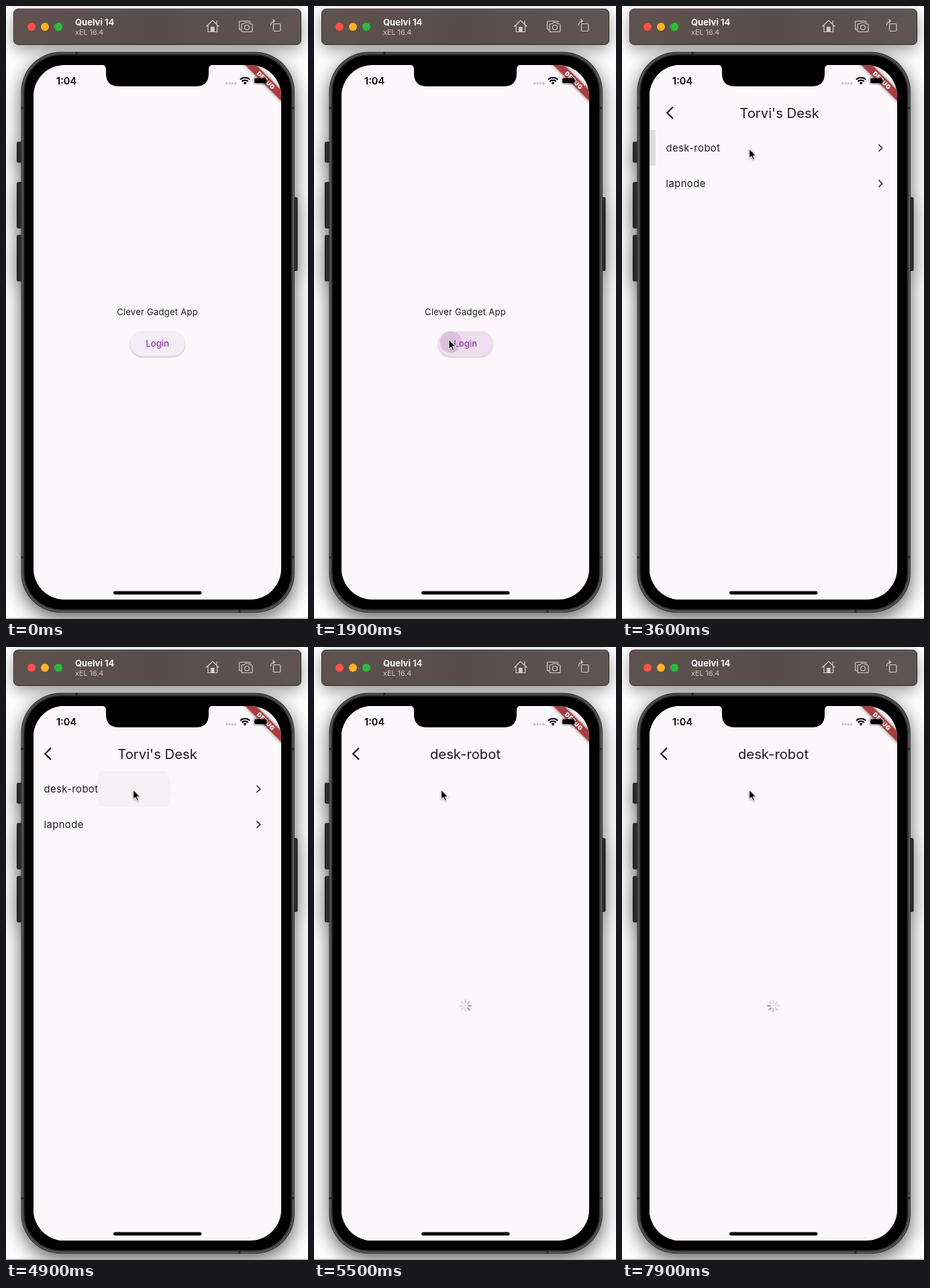
Animation, 450 px wide and 914 px high, one loop 8000 ms. Source, as an HTML page:

```html
<!DOCTYPE html>
<html lang="en">
<head>
<meta charset="utf-8">
<title>Phone walkthrough</title>
<style>
html, body { margin: 0; width: 100%; height: 100%; overflow: hidden; background: #fff; }
svg { display: block; width: 450px; height: 914px; font-family: Inter, Roboto, sans-serif; }
.bar { filter: drop-shadow(0 7px 11px rgba(0,0,0,.4)); }
.body { filter: drop-shadow(0 9px 14px rgba(0,0,0,.62)); }
.line { fill: none; stroke: #d3cdca; stroke-width: 1.2; stroke-linejoin: round; stroke-linecap: round; }
.page > rect:first-child { fill: #fcf7fb; }
.page text { fill: #1d1b20; }
.mid { text-anchor: middle; }
.title { font-size: 20.3px; text-anchor: middle; }
.item { font-size: 14.8px; letter-spacing: .42px; }
.back { fill: none; stroke: #1d1b20; stroke-width: 2.3; }
.next { fill: none; stroke: #49454f; stroke-width: 1.9; }

/* One 8 s timeline: 1% = 80 ms */
.home, .loc, .desk, .robot, .loading, .list, .cursor, .press, .ink, .glow { animation: 8s linear infinite; }
.home { animation-name: home; }
.loc { animation-name: loc; }
.desk { animation-name: desk; }
.robot { animation-name: robot; }
.loading { animation-name: loading; }
.list { animation-name: list; }
.cursor { animation-name: cursor; }
.press { animation-name: press; }
.ink { fill: rgba(200,200,200,.4); }
.glow { fill: rgba(188,188,188,.44); }
.ink.login { fill: #9a4fae; animation-name: ink-login; }
.ink.a { animation-name: ink-a; }
.ink.b { animation-name: ink-b; }
.glow.a { animation-name: glow-a; }
.glow.b { animation-name: glow-b; }
.spin { animation: spin 1s steps(8) infinite; }
.spin.a { animation-delay: -.09s; }
.spin.b { animation-delay: -.05s; }

@keyframes home {
  0%, 23.875% { transform: translateX(0); animation-timing-function: cubic-bezier(.35,.91,.33,.97); }
  30.125%, 100% { transform: translateX(-123px); }
}
@keyframes loc {
  0%, 23.875% { transform: translateX(369px); animation-timing-function: cubic-bezier(.283,.044,.545,.57); }
  25.1125% { transform: translateX(169.4px); animation-timing-function: cubic-bezier(.209,1,.4345,.976); }
  30.125%, 41.175% { transform: translateX(0); animation-timing-function: cubic-bezier(.35,.91,.33,.97); }
  47.425%, 100% { transform: translateX(-123px); }
}
@keyframes desk {
  0%, 41.175% { transform: translateX(369px); animation-timing-function: cubic-bezier(.283,.044,.545,.57); }
  42.4125% { transform: translateX(169.4px); animation-timing-function: cubic-bezier(.209,1,.4345,.976); }
  47.425%, 61.875% { transform: translateX(0); animation-timing-function: cubic-bezier(.35,.91,.33,.97); }
  68.125%, 100% { transform: translateX(-123px); }
}
@keyframes robot {
  0%, 61.875% { transform: translateX(369px); animation-timing-function: cubic-bezier(.283,.044,.545,.57); }
  63.1125% { transform: translateX(169.4px); animation-timing-function: cubic-bezier(.209,1,.4345,.976); }
  68.125%, 100% { transform: translateX(0); }
}
@keyframes loading {
  0% { opacity: 1; animation-timing-function: step-end; }
  32.5%, 100% { opacity: 0; }
}
@keyframes list {
  0% { opacity: 0; animation-timing-function: step-end; }
  32.5%, 100% { opacity: 1; }
}
@keyframes cursor {
  0% { opacity: 0; transform: translate(238px,350px); animation-timing-function: step-end; }
  12.5% { opacity: 1; transform: translate(238px,350px); animation-timing-function: ease-out; }
  16.25%, 35% { opacity: 1; transform: translate(201px,497px); }
  36.25% { opacity: 1; transform: translate(200.5px,357px); }
  37.5% { opacity: 1; transform: translate(192px,238px); }
  38.75%, 100% { opacity: 1; transform: translate(189.5px,212.5px); }
}
@keyframes press {
  0%, 22.9% { opacity: 0; }
  23.7%, 30% { opacity: 1; }
  31%, 100% { opacity: 0; }
}
@keyframes ink-login {
  0%, 22.9% { r: 13px; opacity: 0; }
  23.75% { r: 16px; opacity: .2; }
  26% { r: 48px; opacity: .2; }
  29%, 100% { r: 48px; opacity: 0; }
}
@keyframes ink-a {
  0%, 39.75% { r: 55px; opacity: 0; }
  40.7% { r: 75px; opacity: 1; }
  43% { r: 235px; opacity: 1; }
  45.5%, 100% { r: 235px; opacity: 0; }
}
@keyframes ink-b {
  0%, 60.94% { r: 55px; opacity: 0; }
  61.25% { r: 55.5px; opacity: .33; }
  61.9% { r: 75px; opacity: 1; }
  64.4% { r: 235px; opacity: 1; }
  67%, 100% { r: 235px; opacity: 0; }
}
@keyframes glow-a {
  0%, 40% { opacity: 0; }
  41.9%, 47.4% { opacity: 1; }
  48%, 100% { opacity: 0; }
}
@keyframes glow-b {
  0%, 61.4% { opacity: 0; }
  63%, 68% { opacity: 1; }
  69%, 100% { opacity: 0; }
}
@keyframes spin { to { transform: rotate(360deg); } }
</style>
</head>
<body>
<svg viewBox="0 0 450 914" xmlns="http://www.w3.org/2000/svg">
  <defs>
    <clipPath id="screen"><rect x="41" y="88" width="369" height="797" rx="46"/></clipPath>
    <clipPath id="row"><rect x="41" y="185" width="369" height="53"/></clipPath>
    <clipPath id="pill"><rect x="185" y="485" width="81.5" height="37.5" rx="18.75"/></clipPath>
    <linearGradient id="barFill" x2="1"><stop stop-color="#5f534f"/><stop offset=".5" stop-color="#574d4a"/><stop offset="1" stop-color="#5f5552"/></linearGradient>
    <path id="back" class="back" d="M67 150.500l-8.700 8.700 8.700 8.700"/>
    <path id="next" class="next" d="M373.500 206.500l5.200 5.200-5.200 5.200"/>
    <path id="tick" d="M0-8.500V-4.500" stroke="#3c3c44" stroke-width="1.9" stroke-linecap="round"/>
    <g id="ticks">
      <g opacity=".18">
        <use href="#tick"/><use href="#tick" transform="rotate(45)"/>
        <use href="#tick" transform="rotate(90)"/><use href="#tick" transform="rotate(135)"/>
      </g>
      <use href="#tick" transform="rotate(180)" opacity=".28"/>
      <use href="#tick" transform="rotate(225)" opacity=".38"/>
      <use href="#tick" transform="rotate(270)" opacity=".48"/>
      <use href="#tick" transform="rotate(315)" opacity=".58"/>
    </g>
  </defs>

  <rect width="450" height="914" fill="#fff"/>

  <g class="body">
    <g fill="#2b2c2c" stroke="#121212">
      <rect x="16.500" y="203" width="9" height="30" rx="1.500"/>
      <rect x="16.500" y="263" width="9" height="68" rx="1.500"/>
      <rect x="16.500" y="342" width="9" height="68" rx="1.500"/>
      <rect x="425" y="285.500" width="9" height="109" rx="1.500"/>
    </g>
    <rect x="22.500" y="68.500" width="407.500" height="836" rx="59" fill="#2a2a2a"/>
  </g>
  <rect x="24" y="70" width="404.500" height="833" rx="57.500" fill="#454646" stroke="#686969"/>
  <rect x="27" y="73" width="398.500" height="827" rx="55" fill="#000" stroke="#292a2a"/>
  <path d="M22.500 152h5M425 152h5M22.500 822h5M425 822h5M105 68.500v5M348 899.500v5" stroke="#292929" stroke-width="3"/>

  <g class="bar">
    <rect x="11.500" y="4.500" width="428" height="53" rx="6.500" fill="url(#barFill)" stroke="#2c2725"/>
  </g>
  <path d="M17 5.700H434" stroke="#80766f" stroke-width=".8"/>
  <circle cx="38" cy="31" r="6" fill="#fe5148"/>
  <circle cx="58" cy="31" r="6" fill="#fdb124"/>
  <circle cx="78" cy="31" r="6" fill="#29bd3a"/>
  <text x="103" y="29" font-size="13" font-weight="700" fill="#fff">Quelvi 14</text>
  <text x="103" y="43" font-size="10.800" fill="#d0cac7">xEL 16.4</text>
  <g class="line">
    <path d="M298.500 30.500l9.300-9 9.300 9M301 28.500v10h13.600v-10M314 26.500v-4.500"/>
    <path d="M305.500 38v-6.500h4.600v6.500z" fill="#d3cdca"/>
    <path d="M350 35.500h-.5a2 2 0 0 1-2-2v-9a2 2 0 0 1 2-2h12.500a2 2 0 0 1 2 2"/>
    <path d="M353 26.500h2l1.500-2h5l1.500 2h2a2 2 0 0 1 2 2v8a2 2 0 0 1-2 2h-12a2 2 0 0 1-2-2v-8a2 2 0 0 1 2-2z"/>
    <circle cx="359" cy="32" r="3.500"/>
    <rect x="398.500" y="26.500" width="10.500" height="11" rx="1.500"/>
    <path d="M394.500 28.500c0-4 1.500-6 5.500-6M397.800 20l2.500 2.500-2.500 2.500"/>
  </g>

  <g clip-path="url(#screen)">
    <g class="page home">
      <rect x="41" y="88" width="369" height="797"/>
      <text class="mid" x="225.500" y="461" font-size="13" letter-spacing=".25">Clever Gadget App</text>
      <rect x="185" y="485" width="81.500" height="37.500" rx="18.750" fill="#f4ecf6" style="filter:drop-shadow(0 1px 1px rgba(0,0,0,.3))"/>
      <g clip-path="url(#pill)">
        <rect class="press" x="185" y="485" width="82" height="38" fill="#efdfef"/>
        <circle class="ink login" cx="204" cy="501"/>
      </g>
      <text class="mid" x="225.700" y="508.300" font-size="13" font-weight="500" letter-spacing=".1" style="fill:#8a3a9c">Login</text>
    </g>

    <g class="page loc">
      <rect x="41" y="88" width="369" height="797"/>
      <use href="#back"/>
      <text class="title" x="225.500" y="166.500">Locations</text>
      <g class="loading"><g transform="translate(225.500 535)"><g class="spin a"><use href="#ticks"/></g></g></g>
      <g class="list">
        <g clip-path="url(#row)">
          <rect class="glow a" x="41" y="185" width="369" height="53"/>
          <circle class="ink a" cx="190" cy="212"/>
        </g>
        <text class="item" x="56.500" y="217.200">Torvi's Desk</text>
        <text class="item" x="56.500" y="270.200">Tundo Rental</text>
        <use href="#next"/><use href="#next" y="53"/>
      </g>
    </g>

    <g class="page desk">
      <rect x="41" y="88" width="369" height="797"/>
      <use href="#back"/>
      <text class="title" x="225.500" y="166.500">Torvi's Desk</text>
      <g clip-path="url(#row)">
        <rect class="glow b" x="41" y="185" width="369" height="53"/>
        <circle class="ink b" cx="190" cy="212"/>
      </g>
      <text class="item" x="56.500" y="217.200">desk-robot</text>
      <text class="item" x="56.500" y="270.200">lapnode</text>
      <use href="#next"/><use href="#next" y="53"/>
    </g>

    <g class="page robot">
      <rect x="41" y="88" width="369" height="797"/>
      <use href="#back"/>
      <text class="title" x="225.500" y="166.500">desk-robot</text>
      <g transform="translate(225.500 535)"><g class="spin b"><use href="#ticks"/></g></g>
    </g>

    <g transform="translate(410 88) rotate(45)">
      <rect x="-45" y="26.500" width="90" height="11.300" fill="#a93e40" style="filter:drop-shadow(0 0 2.500px rgba(0,0,0,.5))"/>
      <text class="mid" y="35.500" font-size="9" font-weight="900" letter-spacing=".5" fill="#fff">DEBUG</text>
    </g>
  </g>

  <path d="M143 87.500q6 .5 6 7v6q0 19.300 19 19.300h115q19 0 19-19.300v-6q0-6.500 6-7z"/>
  <text x="75" y="117" font-size="14.600" font-weight="600">1:04</text>
  <g fill="#cac5ca">
    <circle cx="328.700" cy="115.300" r="1.800"/><circle cx="333" cy="115.300" r="1.800"/>
    <circle cx="337.300" cy="115.300" r="1.800"/><circle cx="341.600" cy="115.300" r="1.800"/>
  </g>
  <g fill="none" stroke="#000" stroke-width="2.200">
    <path d="M349 109.700a10 10 0 0 1 14.200 0M351.500 112.500a6.500 6.500 0 0 1 9.200 0"/>
  </g>
  <path d="M356.100 117.200l-2.500-2.600a3.500 3.500 0 0 1 5 0z"/>
  <rect x="368.500" y="106" width="21.500" height="10.800" rx="3.300" fill="none" stroke="#000" stroke-opacity=".35" stroke-width=".9"/>
  <rect x="370" y="107.500" width="18.500" height="7.800" rx="2"/>
  <path d="M391.200 109.700q1.400.4 1.400 1.700t-1.400 1.700z" opacity=".4"/>
  <rect x="160" y="872.500" width="131.500" height="5" rx="2.500"/>

  <path d="M0 913.200H450" stroke="#aaa8ac" stroke-width="1.600"/>

  <g class="cursor">
    <path d="M0 0V14.800L3.300 11.700 5.700 17 8.100 16 5.800 10.800H10.500Z" stroke="#fff" stroke-width="1.100" stroke-linejoin="round" style="filter:drop-shadow(0 1px 1px rgba(0,0,0,.35))"/>
  </g>
</svg>
</body>
</html>
```
